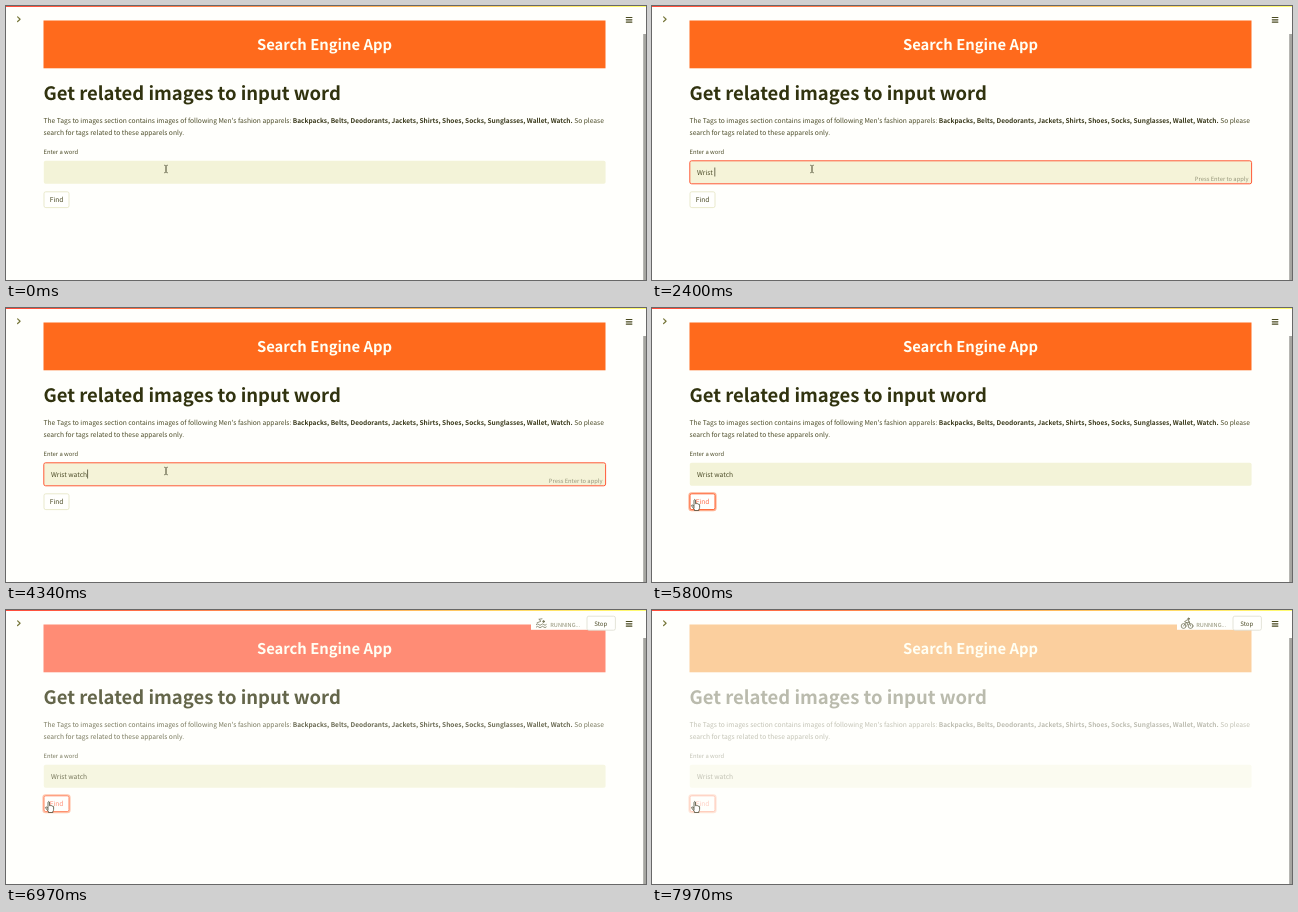
Write an HTML page that moves like this. It is 640 by 274 pixels and loops after 8000 ms.

```html
<!DOCTYPE html>
<html lang="en">
<head>
<meta charset="utf-8">
<title>Search Engine App</title>
<style>
  html, body { margin: 0; width: 100%; height: 100%; overflow: hidden; background: #fffffc; }
  svg { display: block; width: 100vw; height: 100vh; }
  text {
    font: 6.7px "Noto Sans CJK JP", "Noto Sans CJK SC", "Noto Sans CJK", "Open Sans", sans-serif;
    fill: #4c4c28;
    text-rendering: geometricPrecision;
  }
  .bold { font-size: 6.54px; font-weight: 700; fill: #3a3a1c; }
  .title { font-size: 18.48px; font-weight: 700; fill: #31330f; }
  .banner { font-size: 14.8px; font-weight: 700; fill: #fffff4; text-anchor: middle; }
  .label { font-size: 5.85px; }
  .hint { font-size: 5.8px; fill: #96967a; text-anchor: end; }
  .status { font-size: 5.6px; fill: #8c8c70; }
  .stop { font-size: 6.1px; font-weight: 500; }
  .line { fill: none; stroke-linecap: round; stroke-linejoin: round; }
</style>
</head>
<body>
<svg viewBox="0 0 640 274" preserveAspectRatio="none">
  <defs>
    <linearGradient id="strip">
      <stop offset="0" stop-color="#ff4b3c"/>
      <stop offset="1" stop-color="#fffd70"/>
    </linearGradient>
  </defs>
  <rect width="640" height="274" fill="#fffffc"/>
  <rect width="640" height="1" fill="url(#strip)"/>

  <rect id="band" x="37.5" y="14.5" width="562" height="47.8"/>
  <text class="banner" x="318.5" y="44">Search Engine App</text>

  <g id="content">
    <text class="title" x="37.5" y="93.5">Get related images to input word</text>
    <text x="37.5" y="116.8">The Tags to images section contains images of following Men's fashion apparels: <tspan class="bold">Backpacks, Belts, Deodorants, Jackets, Shirts, Shoes, Socks, Sunglasses, Wallet, Watch.</tspan> So please</text>
    <text x="37.5" y="128.8">search for tags related to these apparels only.</text>
    <text class="label" x="37.5" y="147.6">Enter a word</text>
    <rect id="field" x="37.8" y="154.8" width="561.8" height="23" rx="1.8"/>
    <text id="typed" x="45" y="168.6" xml:space="preserve"></text>
    <rect id="caret" y="161.5" width=".7" height="9" fill="#33331a"/>
    <text id="hint" class="hint" x="596.5" y="174.7">Press Enter to apply</text>
    <rect id="ring" x="37.2" y="185" width="26.6" height="17.4" rx="2.4" fill="none" stroke="#ffb393" stroke-width="1.6"/>
    <rect id="button" x="38" y="185.8" width="25" height="15.8" rx="1.8" fill="#fffffd"/>
    <text id="find" x="43.7" y="196.2">Find</text>
  </g>

  <path class="line" d="M11.6 10.9l2.5 2.3-2.5 2.3" stroke="#77773a" stroke-width="1.2"/>
  <path class="line" d="M620.3 11.5h5.6m-5.6 2.3h5.6m-5.6 2.3h5.6" stroke="#4a4a20" stroke-width="1.2"/>
  <rect x="637.2" y="28" width="2.8" height="246" fill="#a5a5a0"/>

  <g id="running">
    <rect x="525" y="6" width="85" height="13.8" fill="#fffffc"/>
    <g class="line" stroke="#77775c" stroke-width=".8">
      <g id="cyclist">
        <circle cx="531.6" cy="16" r="2.4"/><circle cx="538.6" cy="16" r="2.4"/>
        <path d="M531.6 16l2.2-3.4h3.6l1.2 3.4m-1.8-5.2l.7 1.8M532.7 11.6l2.8-2 1.6 2.2"/>
        <path id="leg"/>
        <circle cx="536.6" cy="8.8" r=".8" fill="#77775c"/>
      </g>
      <g id="swimmer">
        <path id="waves"/>
        <path d="M531 12.9l4-1.7-2.2-1.9 3.2-.5"/>
        <circle cx="537.6" cy="11.5" r=".9" fill="#77775c"/>
      </g>
    </g>
    <text class="status" x="544.3" y="16.7">RUNNING...</text>
    <rect x="581" y="6.2" width="28.4" height="14" rx="1.8" fill="#fffffd" stroke="#deded0" stroke-width=".8"/>
    <text class="stop" x="588.2" y="15.6">Stop</text>
  </g>

  <path id="beam" class="line" d="M-1.6-3.8q1.6 0 1.6 1V2.8q0 1-1.6 1M1.6-3.8Q0-3.8 0-2.8V2.8q0 1 1.6 1" stroke="#44442a" stroke-width=".6"/>
  <path id="arrow" d="M0 0v8l1.9-1.7 1.3 2.9 1.2-.5-1.3-2.9h2.5z" fill="#fff" stroke="#33331a" stroke-width=".6"/>
  <path id="hand" d="M-1.3 4V-4.2q.8-1.2 1.5 0V-.6q.9-.8 1.4.2.9-.7 1.4.3 1-.5 1.3.5V3q0 1.4-.8 2.2v1H-.9v-1L-3.7 1.6q0-1.3 1.1-.8l1.3 1.2" fill="#fff" stroke="#33331a" stroke-width=".7" stroke-linejoin="round"/>
</svg>
<script>
  const LOOP = 8000, BLINK = 1000;
  const WORD = 'Wrist watch';
  const KEY_TIMES = [1540, 1740, 1880, 2040, 2240, 2370, 2670, 2820, 2980, 3140, 3300];
  const FOCUS = 100, MOVE = [4470, 5400], CLICK = 5700, RUN = 6140, FADE = 6400;
  const BAND = [
    [6400, [255, 106, 28]], [6670, [255, 106, 82]],
    [7270, [255, 174, 152]], [7970, [251, 207, 158]]
  ];

  const ui = Object.fromEntries([...document.querySelectorAll('svg [id]')].map(el => [el.id, el]));
  const clamp = v => Math.min(1, Math.max(0, v));
  const mix = (a, b, k) => a + (b - a) * k;
  const smooth = k => k * k * (3 - 2 * k);
  const show = (el, on) => { el.style.display = on ? '' : 'none'; };
  const paint = (el, attrs) => { for (const k in attrs) el.setAttribute(k, attrs[k]); };

  function bandColor(t) {
    const next = BAND.findIndex(([time]) => time > t);
    if (next === 0) return BAND[0][1];
    if (next < 0) return BAND.at(-1)[1];
    const [t0, a] = BAND[next - 1], [t1, b] = BAND[next];
    return a.map((v, i) => mix(v, b[i], (t - t0) / (t1 - t0)));
  }

  function drawField(t) {
    const focused = t >= FOCUS && t < CLICK;
    const count = KEY_TIMES.filter(time => time <= t).length;
    const lastKey = count ? KEY_TIMES[count - 1] : FOCUS;
    const text = WORD.slice(0, count);
    if (ui.typed.textContent !== text) ui.typed.textContent = text;
    paint(ui.field, {
      fill: focused ? '#f5f3d8' : '#f3f3d8',
      stroke: focused ? '#ff5a38' : 'none',
      'stroke-width': 1
    });
    show(ui.hint, focused && count);
    show(ui.caret, focused && (t - lastKey) % BLINK < BLINK / 2);
    paint(ui.caret, { x: 45.2 + (count ? ui.typed.getComputedTextLength() : 0) });
  }

  function drawPointer(t) {
    const k = smooth(clamp((t - MOVE[0]) / (MOVE[1] - MOVE[0])));
    const x = mix(160, 43.3, k), y = mix(163, 196.3, k);
    const onButton = x < 63 && y > 185;
    const onField = y < 178;
    for (const [el, on] of [[ui.beam, onField], [ui.hand, onButton], [ui.arrow, !onField && !onButton]]) {
      show(el, on);
      paint(el, { transform: `translate(${x} ${y})` });
    }
    paint(ui.button, { stroke: onButton ? '#ff6030' : '#e4e4c0', 'stroke-width': onButton ? 1 : .8 });
    ui.find.style.fill = onButton ? '#ff7050' : '';
    show(ui.ring, t >= CLICK);
  }

  function drawStatus(t) {
    show(ui.running, t >= RUN);
    const swimming = t >= 6950 && t < 7600;
    show(ui.cyclist, !swimming);
    show(ui.swimmer, swimming);
    const turn = t / 80;
    paint(ui.leg, { d: `M533 11.8l2.3 1.4L${534.8 + Math.cos(turn)} ${15.6 + Math.sin(turn)}` });
    const shift = Math.sin(t / 100) * .5;
    const wave = y => `M${530 + shift} ${y}q1.3-1.4 2.5 0t2.5 0 2.5 0 2.5 0`;
    paint(ui.waves, { d: wave(14.6) + wave(17) });
  }

  function render(t) {
    paint(ui.band, { fill: `rgb(${bandColor(t).map(Math.round)})` });
    ui.content.style.opacity = 1 - .67 * Math.pow(clamp((t - FADE) / 1000), 1.75);
    drawField(t);
    drawPointer(t);
    drawStatus(t);
  }

  const start = performance.now();
  function tick() {
    render((performance.now() - start) % LOOP);
    requestAnimationFrame(tick);
  }
  render(0);
  requestAnimationFrame(tick);
</script>
</body>
</html>
```
